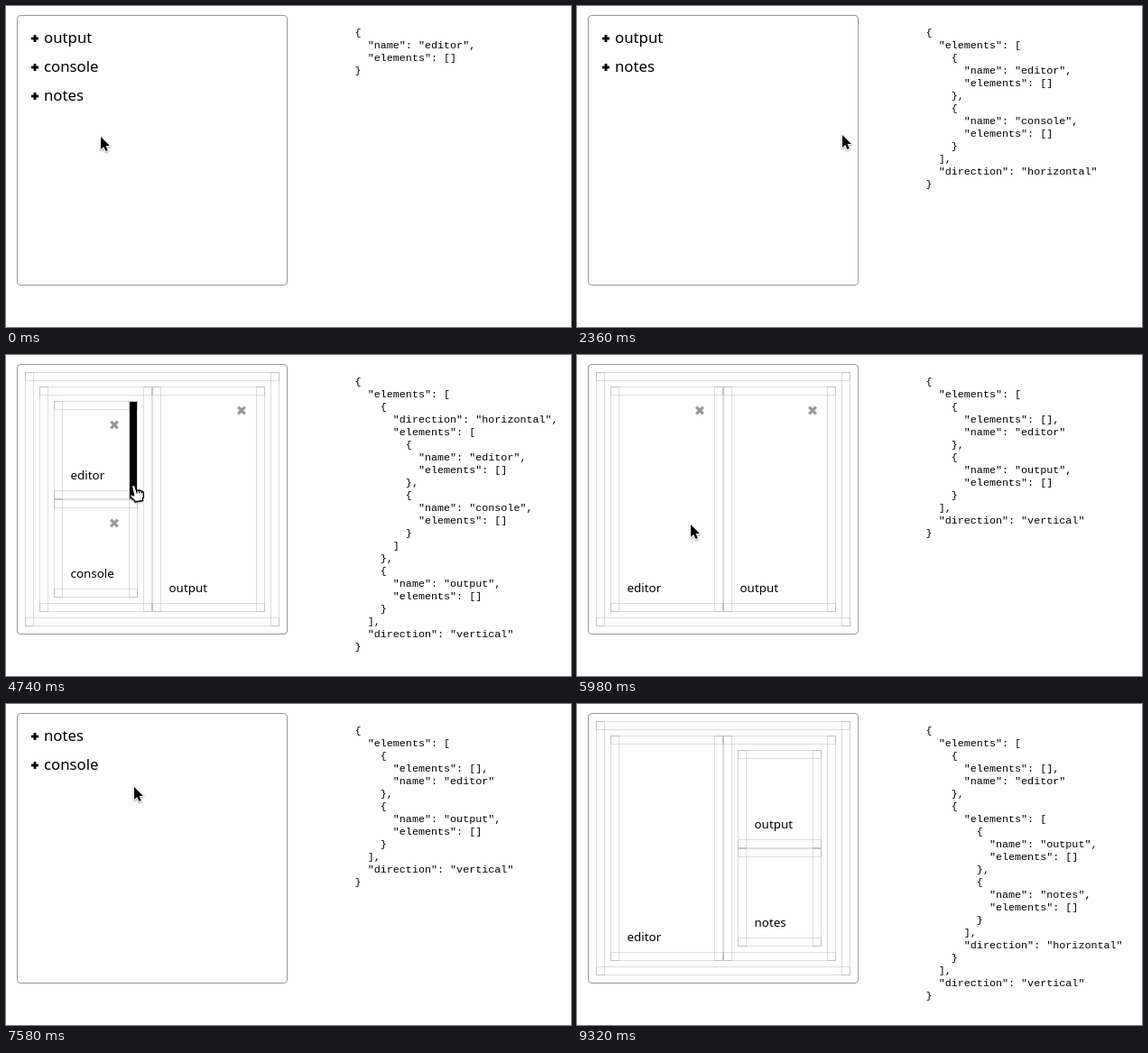
Animation of 626 by 356 pixels, one loop 9.95 s. Source, as an HTML page with a canvas:

```html
<!DOCTYPE html>
<html lang="en">
<head>
<meta charset="utf-8">
<title>Layout editor</title>
<style>
html, body { margin: 0; width: 100%; height: 100%; overflow: hidden; background: #fefefe; }
canvas { display: block; }
</style>
</head>
<body>
<canvas id="stage" width="626" height="356"></canvas>
<script>
const ctx = document.getElementById('stage').getContext('2d');
const LOOP = 9950, BAR = 10, PAD = 16, ROW = 32;
const ROOT = { x: 21, y: 19, w: 282, h: 282 };
const SANS = '"Noto Sans", "Open Sans", sans-serif';
const MONO = '11.72px "Liberation Mono", "Courier New", monospace';

// Layout trees, also shown as JSON on the right
const leaf = name => ({ name, elements: [] });
const kept = name => ({ elements: [], name });
const single = leaf('editor');
const stacked = { elements: [leaf('editor'), leaf('console')], direction: 'horizontal' };
const nestedLeft = {
  elements: [
    { direction: 'horizontal', elements: [leaf('editor'), leaf('console')] },
    leaf('output')
  ],
  direction: 'vertical'
};
const columns = { elements: [kept('editor'), leaf('output')], direction: 'vertical' };
const nestedRight = {
  elements: [
    kept('editor'),
    { elements: [leaf('output'), leaf('notes')], direction: 'horizontal' }
  ],
  direction: 'vertical'
};

const scenes = [
  { at: 0, tree: single, menu: ['output', 'console', 'notes'] },
  { at: 710, tree: stacked },
  { at: 2360, tree: stacked, menu: ['output', 'notes'] },
  { at: 3360, tree: nestedLeft },
  { at: 5470, tree: columns },
  { at: 6940, tree: columns, menu: ['notes', 'console'] },
  { at: 7950, tree: nestedRight }
];

const easeIn = p => p ** 1.6;
const easeOut = p => 1 - (1 - p) ** 1.6;
const smooth = p => p * p * (3 - 2 * p);

// Pointer moves in small jumps: first jump at `from`, last at `to`
const moves = [
  { from: 60, to: 180, steps: 3, x: 105, y: 94, ease: smooth },
  { from: 360, to: 440, steps: 3, x: 105, y: 76, ease: smooth },
  { from: 1180, to: 1850, steps: 12, x: 294, y: 143, ease: smooth },
  { from: 2620, to: 3180, steps: 11, x: 150, y: 38, ease: smooth },
  { from: 4430, to: 4740, steps: 7, x: 143, y: 145, ease: easeIn },
  { from: 4800, to: 5180, steps: 8, x: 124, y: 187, ease: easeOut },
  { from: 5980, to: 6610, steps: 14, x: 231, y: 281, ease: smooth },
  { from: 7170, to: 7720, steps: 10, x: 118, y: 40, ease: smooth },
  { from: 8610, to: 9320, steps: 15, x: 370, y: 372, ease: easeIn }
];

function pointerAt(t) {
  let x = 105, y = 145;
  for (const m of moves) {
    if (t < m.from) break;
    const gap = (m.to - m.from) / (m.steps - 1);
    const step = Math.min(m.steps, 1 + Math.floor((t - m.from) / gap + 0.001));
    const p = m.ease(step / m.steps);
    x += (m.x - x) * p;
    y += (m.y - y) * p;
  }
  return { x, y };
}

const inside = (p, b) => p.x >= b.x && p.x < b.x + b.w && p.y >= b.y && p.y < b.y + b.h;

function text(str, x, y, font) {
  ctx.font = font;
  ctx.fillStyle = '#000';
  ctx.fillText(str, x, y);
}

function drawClose(x, y) {
  ctx.strokeStyle = '#999';
  ctx.lineWidth = 3.3;
  ctx.beginPath();
  ctx.moveTo(x - 3.8, y - 3.8);
  ctx.lineTo(x + 3.8, y + 3.8);
  ctx.moveTo(x + 3.8, y - 3.8);
  ctx.lineTo(x - 3.8, y + 3.8);
  ctx.stroke();
}

function drawBars({ x, y, w, h }, mouse) {
  const bars = [
    { x, y, w: BAR, h },
    { x: x + w - BAR, y, w: BAR, h },
    { x, y, w, h: BAR },
    { x, y: y + h - BAR, w, h: BAR }
  ];
  const hot = bars.filter(b => inside(mouse, b)).pop();
  ctx.lineWidth = 1;
  ctx.strokeStyle = 'rgba(0,0,0,.13)';
  for (const b of bars) ctx.strokeRect(b.x + 0.5, b.y + 0.5, b.w - 1, b.h - 1);
  if (hot) {
    ctx.fillStyle = '#000';
    ctx.fillRect(hot.x + 1, hot.y + 1, hot.w - 2, hot.h - 2);
  }
  return !!hot;
}

// Returns true when the pointer is over something clickable
function drawNode(node, box, mouse, active) {
  let hit = drawBars(box, mouse);
  const kids = node.elements;
  if (!kids.length) {
    const cx = box.x + box.w - 26, cy = box.y + 26.5;
    text(node.name, box.x + 18.5, box.y + box.h - 22, '13.4px ' + SANS);
    if (active) drawClose(cx, cy);
    return hit || inside(mouse, { x: cx - 6, y: cy - 6, w: 12, h: 12 });
  }
  const rows = node.direction === 'horizontal';
  const w = (box.w - 2 * PAD) / (rows ? 1 : kids.length);
  const h = (box.h - 2 * PAD) / (rows ? kids.length : 1);
  kids.forEach((kid, i) => {
    const part = {
      x: box.x + PAD + (rows ? 0 : i * w),
      y: box.y + PAD + (rows ? i * h : 0),
      w, h
    };
    hit = drawNode(kid, part, mouse, active) || hit;
  });
  return hit;
}

function drawMenu(items, mouse) {
  let hit = false;
  items.forEach((name, i) => {
    const y = ROOT.y + i * ROW;
    if (inside(mouse, { x: ROOT.x, y, w: ROOT.w, h: ROW })) {
      hit = true;
      ctx.fillStyle = '#eee';
      ctx.fillRect(ROOT.x, y, ROOT.w, ROW - 1);
    }
    ctx.fillStyle = '#000';
    ctx.fillRect(28, y + 15.6, 8, 2.8);
    ctx.fillRect(30.6, y + 13, 2.8, 8);
    text(name, 42, y + 22, '16.8px ' + SANS);
  });
  return hit;
}

const arrow = new Path2D('M0 0V14L3.2 11 5.5 16 7.8 15 5.6 10H10Z');
const hand = new Path2D('M-3.5 .8Q-3.2-.8-1.8-.7T0 1L1.5 5.5Q2.6 4.2 4.2 5.6 5.6 4.4 7 6.1 8.8 5.7 9.1 8L9.4 12 8.2 14.5 8.5 16.3 0 17.8-.5 16.5-5 12.3Q-6.3 9.8-4.4 9.6L-1.2 11Z');
const fingers = new Path2D('M1.5 5.5L2.3 8.5M4.2 5.6L4.9 8.2M7 6.1L7.5 8.3');

function drawPointer({ x, y }, isHand) {
  ctx.save();
  ctx.translate(Math.round(x), Math.round(y));
  ctx.lineJoin = 'round';
  ctx.lineWidth = isHand ? 1.2 : 2;
  ctx.strokeStyle = isHand ? '#000' : '#fff';
  ctx.fillStyle = isHand ? '#fff' : '#000';
  ctx.shadowColor = 'rgba(0,0,0,.4)';
  ctx.shadowBlur = 2;
  ctx.shadowOffsetY = 1;
  const shape = isHand ? hand : arrow;
  ctx.stroke(shape);
  ctx.shadowColor = 'transparent';
  ctx.fill(shape);
  if (isHand) {
    ctx.stroke(shape);
    ctx.stroke(fingers);
  }
  ctx.restore();
}

function draw(t) {
  const scene = scenes.filter(s => s.at <= t).pop();
  const mouse = pointerAt(t);
  ctx.fillStyle = '#fefefe';
  ctx.fillRect(0, 0, 626, 356);

  ctx.lineWidth = 1;
  ctx.strokeStyle = '#999';
  ctx.beginPath();
  ctx.roundRect(12.5, 10.5, 299, 299, 3.5);
  ctx.stroke();

  const active = inside(mouse, { x: 12, y: 10, w: 300, h: 300 });
  const hit = scene.menu
    ? drawMenu(scene.menu, mouse)
    : drawNode(scene.tree, ROOT, mouse, active);

  JSON.stringify(scene.tree, null, 2).split('\n')
    .forEach((line, i) => text(line, 386.6, 33 + i * 14, MONO));

  drawPointer(mouse, hit);
}

const start = performance.now();
function tick() {
  draw((performance.now() - start) % LOOP);
  requestAnimationFrame(tick);
}
tick();
</script>
</body>
</html>
```
